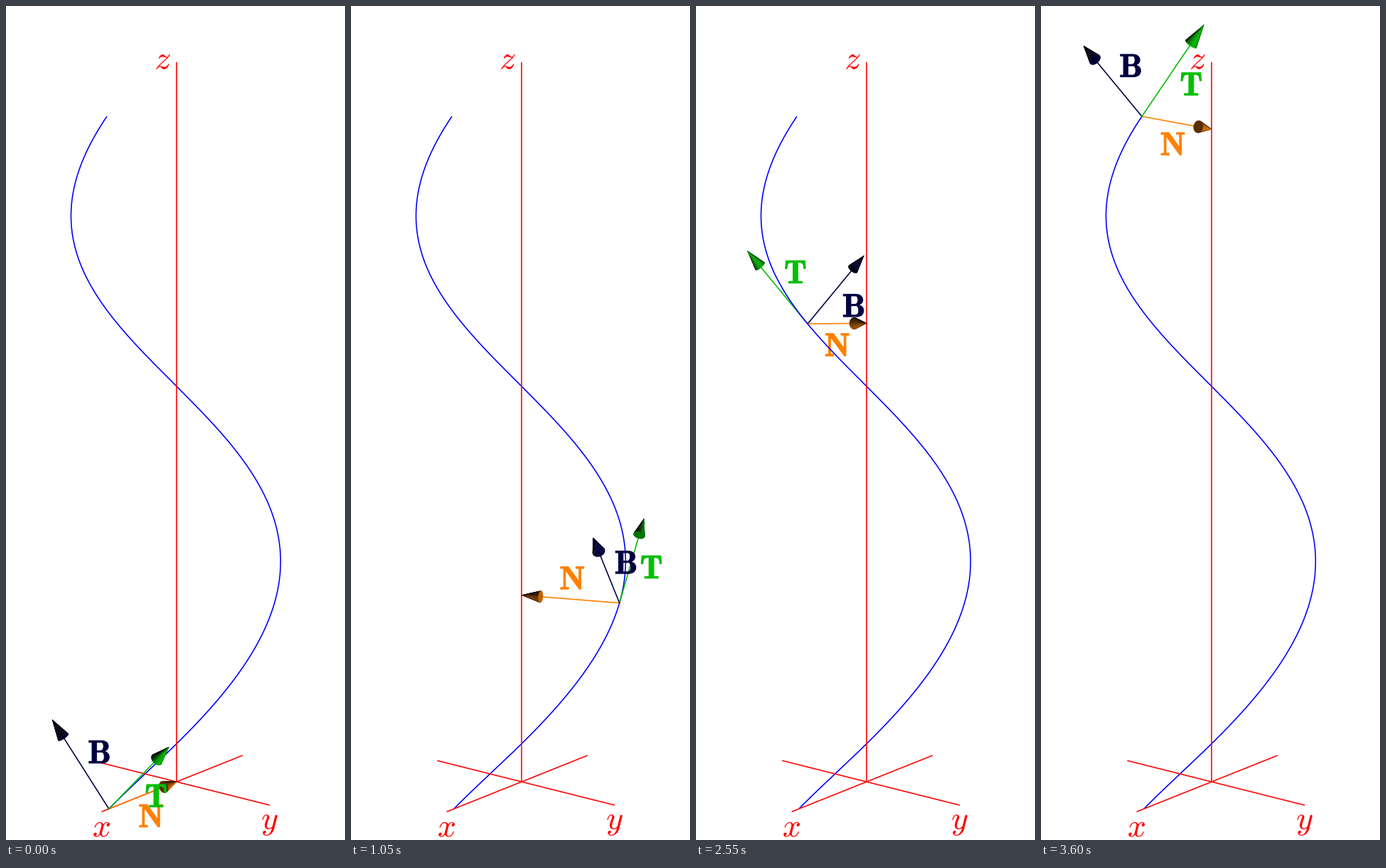
A matplotlib script for the animation above (3.75 s loop, 477 px wide and 1173 px high).

```python
import math

import matplotlib.pyplot as plt
import numpy as np
from matplotlib.animation import FuncAnimation
from matplotlib.collections import PolyCollection
from matplotlib.patches import PathPatch
from matplotlib.path import Path
from matplotlib.textpath import TextPath

plt.rcParams["mathtext.fontset"] = "cm"

W, H, DPI = 477, 1173, 64
PX = 72 / DPI                      # one pixel in points
FRAMES, INTERVAL = 25, 150
TURN = 2 * math.pi

# Camera: azimuth, pitch, distance, height, focal length, screen centre
AZ, PITCH = math.radians(38.4), 0.06
DIST, HEIGHT, FOCAL = 13.5, 4.35, 1986
CX, CY = 240, 580.4
CAMERA = np.array([0, DIST, HEIGHT])
LIGHT = np.array([0.5, 0.8, -0.3]) / math.sqrt(0.98)

HEAD_LEN, HEAD_RAD, SIDES = 0.2, 0.057, 28
EM, MARGIN, LINE = 46, 14, 1.6 * PX
RED, BLUE = "#ff0000", "#0000ff"
COLORS = {"N": (1, 0.5, 0), "B": (0, 0, 0.25), "T": (0, 0.75, 0)}


def project(points):
    """Map (right, toward viewer, up) coordinates to pixels."""
    s, p, z = np.moveaxis(np.asarray(points, float), -1, 0)
    ahead, rise = DIST - p, z - HEIGHT
    depth = ahead * math.cos(PITCH) - rise * math.sin(PITCH)
    lift = rise * math.cos(PITCH) + ahead * math.sin(PITCH)
    return np.stack([CX + FOCAL * s / depth, CY - FOCAL * lift / depth], -1)


def helix(t):
    return np.stack([np.sin(t - AZ), np.cos(t - AZ), t], -1)


def frenet(t):
    """Unit tangent, normal and binormal of the helix."""
    s, c, _ = helix(t)
    r = math.sqrt(0.5)
    return {
        "T": np.array([c, -s, 1]) * r,
        "N": np.array([-s, -c, 0]),
        "B": np.array([-c, s, 1]) * r,
    }


def glyph(tex):
    """Letter outline in pixels with its middle at the origin."""
    path = TextPath((0, 0), f"${tex}$", size=EM)
    box = path.get_extents()
    mid = [(box.x0 + box.x1) / 2, (box.y0 + box.y1) / 2]
    return Path((path.vertices - mid) * [1, -1], path.codes)


def moved(path, xy):
    return Path(path.vertices + xy, path.codes)


def shade(color, normal):
    return np.array(color) * (0.08 + 0.87 * max(0, normal @ LIGHT))


def cone(tip, axis, side, up, color):
    """Visible faces of an arrowhead and their shades."""
    base = tip - HEAD_LEN * axis
    step = TURN / SIDES
    tilt = math.atan2(HEAD_RAD, HEAD_LEN)

    def radial(i):
        return math.cos(i * step) * side + math.sin(i * step) * up

    ring = [base + HEAD_RAD * radial(i) for i in range(SIDES + 1)]
    faces, shades = [], []

    def add(points, normal):
        if normal @ (CAMERA - np.mean(points, axis=0)) > 0:
            faces.append(project(points))
            shades.append(shade(color, normal))

    for i in range(SIDES):
        normal = math.cos(tilt) * radial(i + 0.5) + math.sin(tilt) * axis
        add([tip, ring[i], ring[i + 1]], normal)
    add(ring[:-1], -axis)
    return faces, shades


def label_offset(step, letter):
    """Shift to the right-hand side of an arrow, clear of the letter's box."""
    perp = np.array([-step[1], step[0]]) / math.hypot(*step)
    box = letter.get_extents()
    half = np.array([box.width, box.height]) / 2
    return perp / np.abs(perp).max() * half + MARGIN * perp


fig = plt.figure(figsize=(W / DPI, H / DPI), dpi=DPI, facecolor="white")
ax = fig.add_axes([0, 0, 1, 1])
ax.set_xlim(0, W)
ax.set_ylim(H, 0)
ax.axis("off")


def draw_line(points, color):
    ax.plot(*project(points).T, color=color, lw=LINE, zorder=2,
            solid_capstyle="butt")


def draw_axis(name, start, end, label_shift):
    draw_line([start, end], RED)
    spot = project(end) + label_shift
    ax.add_patch(PathPatch(moved(glyph(name), spot), fc=RED, lw=0, zorder=2))


draw_line(helix(np.linspace(0, TURN, 200)), BLUE)
x_end = 1.1 * np.array([-math.sin(AZ), math.cos(AZ), 0])
y_end = 1.1 * np.array([math.cos(AZ), math.sin(AZ), 0])
z_end = 1.1 * np.array([0, 0, TURN])
draw_axis("x", -x_end, x_end, (0, 25))
draw_axis("y", -y_end, y_end, (0, 28))
draw_axis("z", 0 * z_end, z_end, (-19, 0))


class Arrow:
    def __init__(self, name, color):
        self.name, self.color = name, color
        self.letter = glyph(rf"\mathbf{{{name}}}")
        self.shaft, = ax.plot([], [], color=color, lw=LINE)
        self.head = PolyCollection([], lw=0.4 * PX)
        ax.add_collection(self.head, autolim=False)
        # A fine outline gives the letters their heavy weight
        self.label = ax.add_patch(
            PathPatch(self.letter, fc=color, ec=color, lw=1.1 * PX))

    def place(self, origin, vectors):
        axis = vectors[self.name]
        side, up = (v for k, v in vectors.items() if k != self.name)
        start, neck, tip = project(
            [origin, origin + (1 - HEAD_LEN) * axis, origin + axis])
        self.shaft.set_data([start[0], neck[0]], [start[1], neck[1]])

        faces, shades = cone(origin + axis, axis, side, up, self.color)
        self.head.set_verts(faces)
        self.head.set_facecolor(shades)
        self.head.set_edgecolor(shades)

        spot = (start + tip) / 2 + label_offset(tip - start, self.letter)
        self.label.set_path(moved(self.letter, spot))

        # The near half of the turn passes in front of curve and axes
        layer = (3 if origin[1] > 0 else 1) + 0.1 * (origin + axis / 2)[1]
        for artist in (self.shaft, self.head, self.label):
            artist.set_zorder(layer)


arrows = [Arrow(name, color) for name, color in COLORS.items()]


def update(frame):
    t = TURN * frame / (FRAMES - 1)
    for arrow in arrows:
        arrow.place(helix(t), frenet(t))
    return []


anim = FuncAnimation(fig, update, frames=FRAMES, interval=INTERVAL,
                     repeat=True, repeat_delay=0, blit=False)
plt.show()
```
